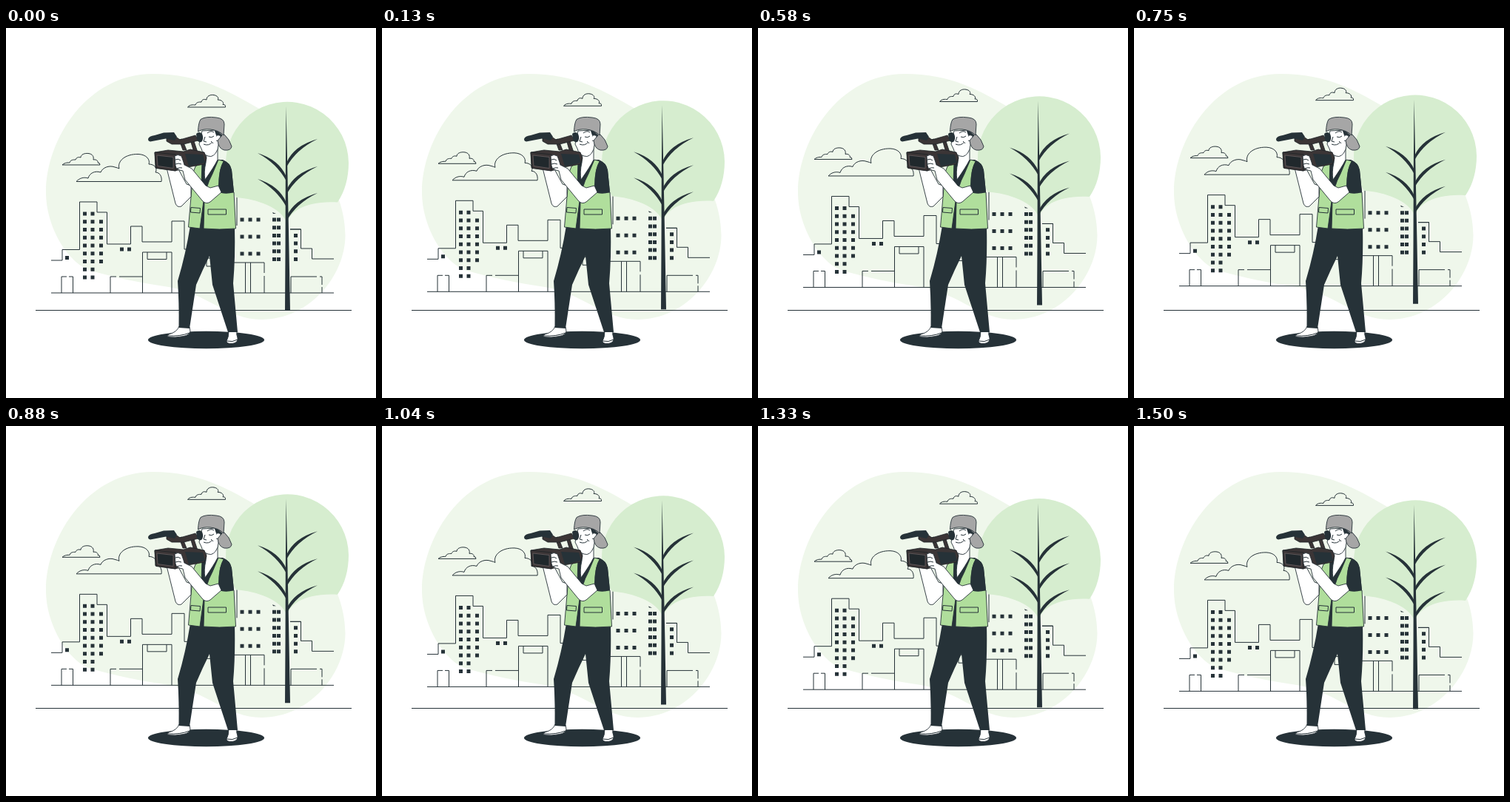
These frames come from a looping animation (500 by 500 pixels, 1.54 s). An HTML page:

```html
<!DOCTYPE html>
<html lang="en">
<head>
<meta charset="utf-8">
<title>Camera operator in the city</title>
<style>
html, body { margin: 0; width: 100%; height: 100%; overflow: hidden; background: #fff; }
svg { display: block; width: 100vw; height: 100vh; }
.line { fill: none; stroke: #263238; stroke-width: 1; stroke-linejoin: round; }
.dark { fill: #263238; }
.skin, .vest, .cap { stroke: #263238; stroke-width: .9; stroke-linejoin: round; }
.skin { fill: #fff; }
.vest { fill: #b0de9c; }
.cap { fill: #a6a6a6; }
.metal { fill: #3b3536; stroke: #1c2226; stroke-width: .8; stroke-linejoin: round; }
</style>
</head>
<body>
<svg viewBox="0 0 500 500">
  <path fill="#eff7eb" d="M54 222C54 150 110 62 198 62C262 62 300 85 342 109C395 140 458.500 205 458.500 280C458.500 335 410 394 345 394C300 394 270 358 220 350C180 344 150 338 115 328C85 319 54 270 54 222Z"/>

  <g class="float">
    <g class="line">
      <path d="M61 314H76V299.500H99.500V235H123V249H136.500V292H168.500V268H184V289H224V261H241V299H249"/>
      <path d="M61 358H443M75 358V336H82M85 336H90.500V358M141 358V336H149M153 336H184"/>
      <path d="M184.500 358V303H224V358M191 303V312.500H217V303"/>
      <path d="M312 229V267M271 311H282M271 311V322H282M300 317H349V331M349 335V358M323.500 317V358M330.500 317V358"/>
      <path d="M384 272H398.500V298H413.500V312H443M385 358V336H420M424 336H427V347M427 350V358"/>
    </g>
    <g class="dark" id="windows"></g>
    <g class="line">
      <path d="M95 207.500C99 203 105 201 111 203C113 196 120 192.500 128 195C130 189 139 185 147 188Q151 189 153 190C150 180 161 170 179 170.500C190 171 195 178 193 184C201 184 205 190 202 195C208 195 211 201 210 207.500Z"/>
      <path d="M76 185C80 181.500 84 182 86 182C87 178 91 178 94 178C95 175 98 174 101 175C101 171 106 169 111 169.500C117 170 119 174 118 178C123 177 125 181 124 182Q127 182 127 185Z"/>
      <path d="M245.500 107C249 103 253 104 256 104C257 100 261 100 264 100C265 96 268 96 271 97C271 92 276 90 280 90.500C286 91 288 95 286 97C292 97 295 101 293 103.500Q297 103 296.500 107Z"/>
    </g>
  </g>

  <path class="line" stroke-width="1.2" d="M40 381.500H467"/>

  <g class="float">
    <path fill="#d6edcf" d="M380 264C383 248 405 233 448 235.500C458 221 463 202 463 182A83 83 0 1 0 311 229C338 231 372 242 380 264Z"/>
    <g class="dark" id="windows2"></g>
    <path class="line" d="M384 272H398.500V298"/>
    <path class="dark" d="M378.500 106L380.500 200L382.500 300L384 382H377L377.500 300L377.800 200Z"/>
    <g class="dark" id="branches"></g>
  </g>

  <ellipse class="dark" cx="270.500" cy="421.500" rx="78.500" ry="11.700"/>

  <g id="man">
    <path class="skin" d="M234 403L248 404L249 410Q248 415 240 416.500Q228 419 219 417.500Q217 415 221 413.500Q231 411 234 403Z"/>
    <path class="line" stroke-width=".8" d="M219 416Q235 417 248 412"/>
    <path class="skin" d="M301 409L312 409Q311 414 313 419Q314 425 306 426.500Q298 427 298 423Q301 418 301 409Z"/>
    <path class="line" stroke-width=".8" d="M298.500 423Q306 425 313 421"/>
    <path class="dark" d="M249 267L309 269Q310 310 307 345L313 411L300 411L279 347L275 308Q266 326 257 347L248 406L233.500 405Q234 370 232 342Q243 305 249 267Z"/>

    <path class="dark" d="M257 183L272 178L293 178Q303 182 305 192L308 222L291 224L290 270L250 270Z"/>
    <path class="skin" d="M272 160L286 156V178Q281 188 269 205Q267 195 270 182Z"/>
    <path class="vest" d="M265 181L256 187Q252 194 252 205L246.500 269L262 271L267 234L264 210Z"/>
    <path class="vest" d="M287 178L295 180Q288 190 289 203L291 222L308 222L310.500 271Q288 273 267 271L268 236Q269 215 279 197Z"/>
    <path class="line" d="M250 242.500L262.500 243.500L262 250L249.500 249ZM273 245H297.500V252H273Z"/>
    <path class="dark" d="M294 179Q303 182 305 192L308 222Q299 225 291 223L287 214Q287 192 294 179Z"/>

    <path class="skin" d="M217 189L232 189L244 211L250 213V228L237 241Q231 243 229 237Z"/>
    <path class="skin" d="M265 139L285 138L288 152L286 164Q281 176 273 173Q266 171 264 163L261 157Z"/>
    <path class="dark" d="M282 139H294L293 149Q290 152 286 150L284 145Z"/>
    <path class="skin" d="M285 145Q291 144 290 149Q288 154 284 152"/>
    <path class="line" d="M272 142Q277 138 281 141M274 147Q278 149 281 146M267 157Q274 160 279 154M277 153L280 156M269 147L267 153L271 154"/>
    <path class="cap" d="M284 139L295 144Q302 150 305 160Q304 166 295 165Q287 163 286 152L292 145Z"/>
    <path class="cap" d="M259.500 140Q260 128 263 123.500Q270 119 284 121Q295 122 295 130L294 145Q287 138 276 137Q266 136 259.500 140Z"/>

    <path class="metal" d="M234 151L238 150L244 165H239ZM249 151L253 150L259 168H254Z"/>
    <path class="metal" d="M217 149L231 148L235 151L256 145L260 152L240 157L224 157L217 153Z"/>
    <path class="dark" d="M257 143Q261 139 265 143Q268 150 264 154Q260 155 258 151Z"/>
    <path class="dark" d="M192 150Q193 146 201 145L213 141.500L227 141L231 147L228 152L216 149.500L195 153.500Q192 153 192 150Z"/>
    <path class="line" stroke="#50575a" d="M213 142L216 149"/>
    <path class="metal" d="M201 168L219 165L240 167L249 164L268 168L271 176L268 184L246 188L229 193L202 189Z"/>
    <path class="dark" d="M242 170L266 171L269 182L247 187Z"/>
    <path class="metal" d="M201 168L229 171V193L203 189.500Z"/>
    <path fill="#20282c" stroke="#706667" stroke-width=".7" d="M204 172L226 174.500V189.500L205 186.500Z"/>

    <path class="skin" d="M228 173Q232 170 237 173Q240 181 241 185L251 190L270 213L276 216L287 213L291 222L276 235Q270 239 265 233L242 205L239 193Q230 192 229 186Z"/>
    <path class="line" stroke-width=".8" d="M229 178Q233 176 236 179M229 184Q233 182 237 184M231 190Q235 188 238 189"/>
  </g>
</svg>
<script>
const LOOP = 1540, PEAK = 735, RISE = 10, START = .45;
const pick = id => document.getElementById(id);
const pane = (x, y) => `M${x - 2.5} ${y - 2.5}h5v5h-5z`;
const fill = (id, d) => pick(id).innerHTML = `<path d="${d}"/>`;

let left = pane(82.5, 310.5) + pane(156.5, 299) + pane(166.5, 299);
for (let row = 0; row < 9; row++) {
  const y = 251 + row * 10.75;
  left += pane(106.5, y) + pane(117, y);
  if (row > 0 && row < 7) left += pane(128.5, y);
}
fill("windows", left);

let right = "M360 249l5 2h-4z";
for (const y of [259, 282, 305])
  for (const x of [319, 330, 341]) right += pane(x, y);
for (let row = 0; row < 6; row++) {
  const y = 259 + row * 10.7;
  right += pane(362.5, y) + pane(368.5, y);
  if (row > 1) right += pane(391.5, y);
}
fill("windows2", right);

// Each branch tapers from the trunk to its tip.
function branch(y, side) {
  const x = 379, tip = x + side * (side > 0 ? 42 : 39), top = y - 31;
  return `M${x} ${y + 1}Q${x + side * 10} ${y - 22} ${tip} ${top}` +
    `Q${x + side * 13} ${y - 17} ${x} ${y + 7}Z`;
}
fill("branches", [[181, 1], [200, -1], [218, 1], [235, -1], [254, 1]]
  .map(([y, side]) => branch(y, side)).join(""));

const layers = document.querySelectorAll(".float");
function draw(now) {
  const gap = Math.abs(now % LOOP - PEAK);
  const away = Math.min(gap, LOOP - gap);
  const y = START - RISE * (1 - away / (LOOP / 2));
  for (const layer of layers) layer.setAttribute("transform", `translate(0 ${y.toFixed(3)})`);
}

let begin;
function tick(now) {
  begin ??= now;
  draw(now - begin);
  requestAnimationFrame(tick);
}
draw(0);
requestAnimationFrame(tick);
</script>
</body>
</html>
```
